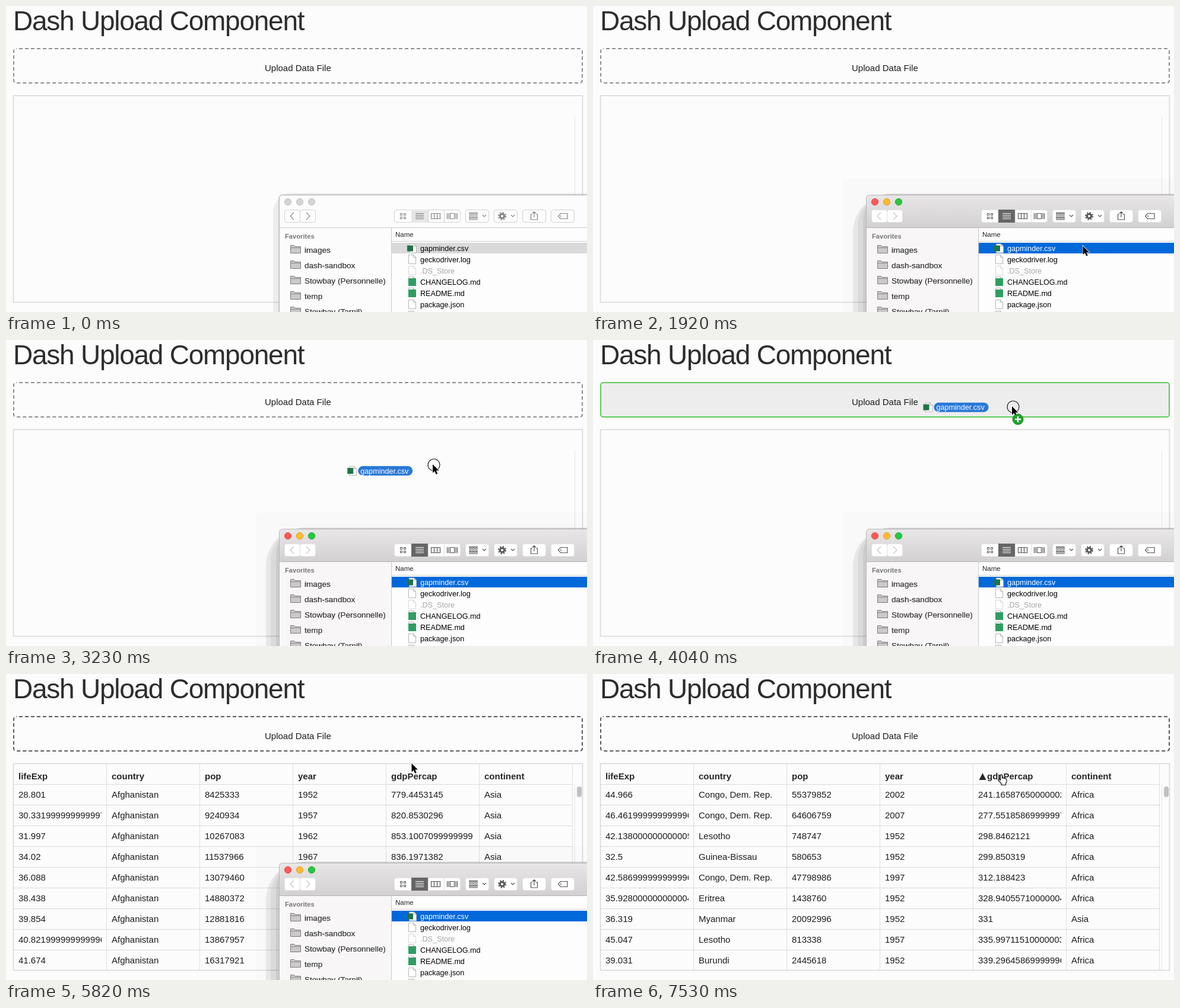
Animation, 979 px wide and 517 px high, one loop 8 s. Source, as an HTML page:

```html
<!DOCTYPE html>
<html lang="en">
<head>
<meta charset="utf-8">
<title>Upload component</title>
<style>
html, body { margin: 0; width: 100%; height: 100%; overflow: hidden; background: #fcfcfc; }
svg { display: block; }
text { font-family: "Liberation Sans", Arial, sans-serif; white-space: pre; }
</style>
</head>
<body>
<svg id="stage" width="979" height="517" viewBox="0 0 979 517"></svg>
<script>
const LOOP = 8000;
const stage = document.getElementById('stage');

const text = (x, y, s, size, fill = '#1c1c1c', extra = '') =>
  `<text x="${x}" y="${y}" font-size="${size}" fill="${fill}" ${extra}>${s}</text>`;
const rect = (x, y, w, h, fill, extra = '') =>
  `<rect x="${x}" y="${y}" width="${w}" height="${h}" fill="${fill}" ${extra}/>`;
const path = (d, extra = '') => `<path d="${d}" ${extra}/>`;
const group = (id, body) => `<g id="${id}">${body}</g>`;

// Table
const COL = 157, ROW = 35;
const HEADS = ['lifeExp', 'country', 'pop', 'year', 'gdpPercap', 'continent'];
const BY_YEAR = `28.801|8425333|779.4453145
30.331999999999997|9240934|820.8530296
31.997|10267083|853.1007099999999
34.02|11537966|836.1971382
36.088|13079460|739.9811057999999
38.438|14880372|786.11336
39.854|12881816|978.0114388000001
40.821999999999996|13867957|852.3959447999999
41.674|16317921|649.3413952000001`.split('\n').map((line, i) => {
  const [life, pop, gdp] = line.split('|');
  return [life, 'Afghanistan', pop, 1952 + 5 * i, gdp, 'Asia'];
});
const BY_GDP = `44.966|Congo, Dem. Rep.|55379852|2002|241.16587650000002|Africa
46.461999999999996|Congo, Dem. Rep.|64606759|2007|277.55185869999997|Africa
42.138000000000005|Lesotho|748747|1952|298.8462121|Africa
32.5|Guinea-Bissau|580653|1952|299.850319|Africa
42.586999999999996|Congo, Dem. Rep.|47798986|1997|312.188423|Africa
35.928000000000004|Eritrea|1438760|1952|328.94055710000004|Africa
36.319|Myanmar|20092996|1952|331|Asia
45.047|Lesotho|813338|1957|335.99711510000003|Africa
39.031|Burundi|2445618|1952|339.29645869999996|Africa`.split('\n').map(line => line.split('|'));

function table(rows, sorted) {
  let out = '';
  for (let c = 1; c <= 6; c++) out += rect(12 + COL * c, 152, 1, 349, '#dedede');
  for (let r = 0; r < 9; r++) out += rect(13, 186 + ROW * r, 942, 1, '#dadada');
  HEADS.forEach((head, c) => {
    const shift = sorted && c === 4 ? 15 : 0;
    out += text(21 + COL * c + shift, 178, head, 15, '#262626', 'font-weight="bold"');
  });
  if (sorted) out += path('M650.5 179L656.5 167.5L662.5 179Z', 'fill="#262626"');
  rows.forEach((row, r) => row.forEach((value, c) => {
    out += `<svg x="${12 + COL * c}" y="${187 + ROW * r}" width="149" height="34">${text(9, 22, value, 15)}</svg>`;
  }));
  return out + rect(962, 190, 8, 18, '#c1c1c1', 'rx="4"');
}

// File icons
const page = (x, y) => path(`M${x} ${y}h8l4 4v11h-12z`, 'fill="#fff" stroke="#b5b5b5"') +
  path(`M${x + 8} ${y}v4h4`, 'fill="none" stroke="#b5b5b5"');
const sheet = (x, y) => page(x + 3.5, y + 0.5) + rect(x, y + 3, 10, 10, '#217346');
const marked = (x, y) => page(x, y) + rect(x - 0.5, y + 2.5, 13, 13, '#2f9e62');
const folder = y => path(`M479.5 ${y + 13.5}V${y + 0.5}h6l1.5 2h9.5v11z`, 'fill="#cbc9c9" stroke="#7c7a7a"') +
  path(`M480 ${y + 4.5}h16`, 'stroke="#8c8a8a"');

function toolbar(active) {
  const ink = active ? '#555' : '#858585';
  const edge = active ? '#e4e2e3' : '#d2d2d2';
  const button = (x, w) => rect(x + 0.5, 344.5, w - 1, 21, active ? '#fff' : '#fdfdfd', `rx="3.5" stroke="${edge}"`);
  const line = (d, color = ink) => path(d, `fill="none" stroke="${color}" stroke-width="1.2"`);
  let out = [[469, 27], [495, 27], [654, 112], [774, 40], [822, 40], [870, 40], [918, 40]]
    .map(b => button(...b)).join('');
  out += rect(683, 344, 28, 22, active ? '#666' : '#e6e6e6');
  out += line('M711.5 345v20M738.5 345v20', edge);
  const arrows = active ? '#c4c4c4' : '#888';
  out += line('M485 349l-6 6l6 6M506 349l6 6l-6 6', arrows);
  for (const x of [664, 670]) for (const y of [350, 356]) out += rect(x + 0.5, y + 0.5, 3, 3, 'none', `stroke="${ink}"`);
  out += line('M690 350.5h14M690 353.5h14M690 356.5h14M690 359.5h14', active ? '#fff' : '#777');
  out += line('M716.5 350.5h15v9h-15zM721.5 350v10M726.5 350v10');
  out += line('M743.5 350v10M746 350v10M748.5 350.5h7v9h-7zM758 350v10M760.5 350v10');
  for (const y of [349, 356]) {
    out += line(`M780 ${y}.5h15`);
    for (const x of [781, 786, 791]) out += rect(x, y + 2, 3, 3, 'none', `stroke="${ink}"`);
  }
  out += line('M803 353l3 3l3 -3M851 353l3 3l3 -3');
  out += `<circle cx="836" cy="355" r="3.6" fill="none" stroke="${ink}" stroke-width="3"/>
    <circle cx="836" cy="355" r="6" fill="none" stroke="${ink}" stroke-width="2" stroke-dasharray="2.4 2.31"/>`;
  out += line('M887 352h-2.5v9h11v-9h-2.5M890 357v-9M887 350.5l3 -3l3 3');
  out += line('M934.5 350.5h11.5v9h-11.5l-4 -4.5z') + `<circle cx="935" cy="355" r="1" fill="${ink}"/>`;
  return out;
}

// Stepped shadow: x, y, corner radius, opacity
const SHADOW = {
  active: [[421, 292, 2, 0.012], [438, 317, 65, 0.07], [446, 317, 56, 0.055], [455, 318, 44, 0.07]],
  idle: [[450, 316, 32, 0.06], [459, 318, 7, 0.13]]
};

function fileWindow(active) {
  let out = SHADOW[active ? 'active' : 'idle'].map(([x, y, r, opacity]) =>
    rect(x, y, 640, 320, '#000', `rx="${r}" opacity="${opacity}"`)).join('');
  out += rect(460.5, 319.5, 600, 260, active ? 'url(#bar)' : '#fcfcfc', `rx="5" stroke="${active ? '#b9b7b7' : '#bdbdbd'}"`);
  out += rect(461, 375, 188, 142, active ? '#f8f6f6' : '#fcfcfc') + rect(650, 375, 329, 142, '#fdfdfd');
  out += rect(461, 374, 518, 1, active ? '#b4b2b2' : '#c8c8c8') + rect(649, 375, 1, 142, '#c9c9c9') +
    rect(650, 397, 329, 1, '#cfcfcf');
  const lights = active ? ['#fc5b57', '#fdbb2f', '#29c740'] : ['#d4d4d4', '#d4d4d4', '#d4d4d4'];
  const rims = active ? ['#df4744', '#de9f25', '#1aab2e'] : ['#c2c2c2', '#c2c2c2', '#c2c2c2'];
  lights.forEach((fill, i) =>
    out += `<circle cx="${475 + 20 * i}" cy="331" r="5.6" fill="${fill}" stroke="${rims[i]}"/>`);
  out += toolbar(active);
  out += text(470, 393, 'Favorites', 11.2, '#777', 'font-weight="bold"');
  ['images', 'dash-sandbox', 'Stowbay (Personnelle)', 'temp', 'Stowbay (Tarnil)'].forEach((name, i) => {
    out += folder(404 + 26 * i) + text(503, 417 + 26 * i, name, 13.6, '#333', 'stroke="#333" stroke-width=".2"');
  });
  out += text(656, 390, 'Name', 11.5, '#222');
  out += rect(650, 400, 329, 18, active ? '#0068d9' : '#dadada');
  ['gapminder.csv', 'geckodriver.log', '.DS_Store', 'CHANGELOG.md', 'README.md', 'package.json'].forEach((name, i) => {
    const y = 401.5 + 19 * i;
    const faded = name === '.DS_Store';
    const icon = i === 0 ? sheet(676, y) : name.endsWith('.md') ? marked(678.5, y - 1) : page(678.5, y);
    out += `<g opacity="${faded ? 0.5 : 1}">${icon}</g>`;
    out += text(698, 414 + 19 * i, name, 12.6, i === 0 && active ? '#fff' : faded ? '#a6a6a6' : '#000');
  });
  return out + page(678.5, 515.5);
}

stage.innerHTML = `
  <defs><linearGradient id="bar" gradientUnits="userSpaceOnUse" x1="0" y1="320" x2="0" y2="374">
    <stop stop-color="#e8e6e7"/><stop offset="1" stop-color="#d2d0d1"/></linearGradient></defs>` +
  rect(0, 0, 979, 517, '#fcfcfc') +
  text(12, 40.5, 'Dash Upload Component', 46, '#2d2d2d', 'letter-spacing="-1.25"') +
  rect(13, 72, 958, 58, 'none', 'id="zone" rx="4" stroke-width="2" stroke-dashoffset="5"') +
  text(436, 110, 'Upload Data File', 15) +
  rect(12.5, 151.5, 959, 349, 'none', 'stroke="#d6d6d6" stroke-width="1.5"') +
  rect(958, 187, 1, 313, '#e6e6e6') +
  group('byYear', table(BY_YEAR, false)) +
  group('byGdp', table(BY_GDP, true)) +
  group('idle', fileWindow(false)) +
  group('active', fileWindow(true)) +
  group('label', sheet(0, 0) + rect(18, 0, 92, 16, '#2a78d8', 'rx="8"') + text(22, 12.5, 'gapminder.csv', 12.6, '#fff')) +
  group('pointer',
    `<circle id="ring" r="10" fill="none" stroke="#222" stroke-width="1.2"/>` +
    path('M-2 -1V13.5L1.4 10.4L3.8 16L6.2 15L3.9 9.4H8.4Z', 'id="arrow" stroke="#fff" stroke-width="1.4" paint-order="stroke"') +
    path('M-1.5 1.2Q0 -1 1.5 1.2V6Q3 4.8 4.2 6.4Q5.8 5.4 6.6 7Q8.8 6.4 9 8.5V12L7.5 15V17.5H0V15L-5 9.5Q-5.5 7.5 -3.4 7.8L-1.5 9.5Z',
      'id="hand" fill="#fff" stroke="#111" stroke-width="1.2"') +
    group('badge', '<circle cx="8" cy="21" r="9" fill="#22a32a" stroke="#178a1f"/>' +
      path('M8 16v10M3 21h10', 'stroke="#fff" stroke-width="2.4"')));

const part = Object.fromEntries([...stage.querySelectorAll('[id]')].map(el => [el.id, el]));
const show = (name, on) => part[name].setAttribute('display', on ? 'inline' : 'none');
const place = (name, x, y) => part[name].setAttribute('transform', `translate(${x} ${y})`);

// Pointer stops: time, x, y. Each holds until the next.
const STOPS = [
  [720, 934, 375], [830, 878, 375], [950, 846, 387], [1060, 837, 399], [1180, 834.5, 404],
  [1800, 830, 406], [1920, 827.5, 406.5], [2760, 802, 398], [2870, 795, 384], [2990, 783, 343],
  [3110, 765, 285], [3230, 721, 211], [3350, 717, 172], [3460, 711, 141.5], [3580, 710, 131],
  [3700, 709, 122], [3810, 708, 117], [3930, 708, 114], [4040, 708, 113],
  [4870, 704, 120], [4990, 697, 133], [5110, 690, 144], [5230, 686, 150], [5350, 686, 151],
  [5820, 685.5, 152], [6830, 686, 162], [6940, 688, 170]
];
const CLICKS = [[1420, 1530], [2400, 4280], [6110, 6350], [7180, 7290]];
const LAG = 0.13;

function render(t) {
  const within = (from, to) => t >= from && t < to;
  const hover = within(3580, 4520);
  const zone = part.zone;
  zone.setAttribute('fill', hover ? '#ededed' : 'none');
  zone.setAttribute('stroke', hover ? '#5fcb5f' : t < 3580 ? '#8f8f8f' : '#5a5a5a');
  zone.setAttribute('stroke-dasharray', hover ? 'none' : '6 4');

  show('byYear', within(4870, 7410));
  show('byGdp', t >= 7410);
  show('idle', t < 1680);
  show('active', within(1680, 6230));

  const i = STOPS.findLastIndex(stop => t >= stop[0]);
  show('pointer', i >= 0);
  show('label', within(2870, 4280));
  if (i < 0) return;
  const [, x, y] = STOPS[i];
  const [, px, py] = STOPS[Math.max(0, i - 1)];
  place('pointer', x, y);
  place('label', x + LAG * (px - x) - 151.5, y + LAG * (py - y) - 7.5);
  show('ring', CLICKS.some(([from, to]) => within(from, to)));
  show('badge', within(3580, 4280));
  show('arrow', t < 6940);
  show('hand', t >= 6940);
}

const start = performance.now();
function tick() {
  render((performance.now() - start) % LOOP);
  requestAnimationFrame(tick);
}
tick();
</script>
</body>
</html>
```
